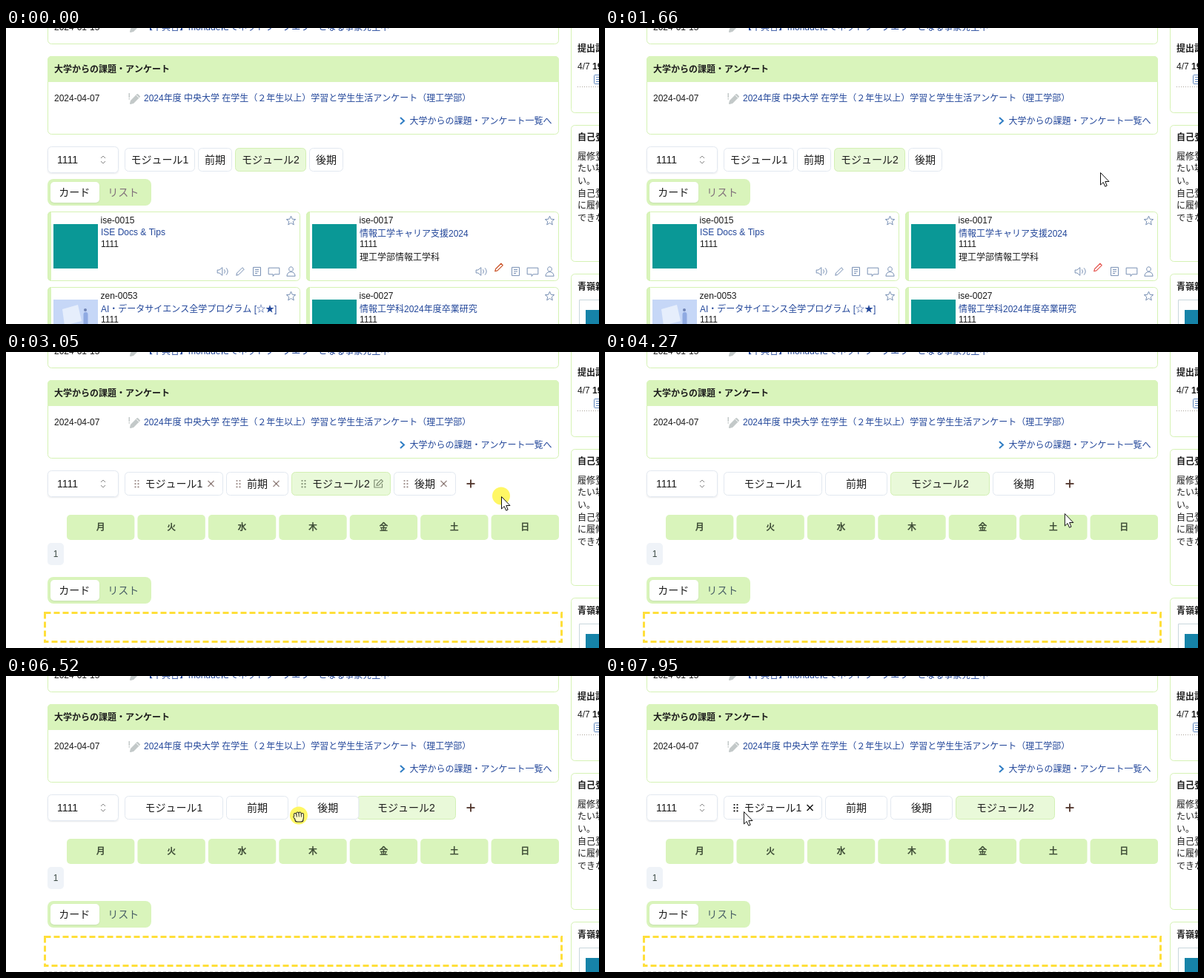
Animation of 800x400 px, one loop 8 s. Source, as an HTML page with a canvas:

```html
<!DOCTYPE html>
<html lang="ja">
<head>
<meta charset="utf-8">
<title>タブの並べ替え</title>
<style>
html, body { margin: 0; width: 100%; height: 100%; overflow: hidden; background: #fff; }
canvas { display: block; }
</style>
</head>
<body>
<canvas id="stage" width="800" height="400"></canvas>
<script>
const ctx = document.getElementById('stage').getContext('2d');
const LOOP = 8000;
const FONT = '"Liberation Sans", "Noto Sans CJK JP", "Noto Sans CJK", sans-serif';
const GREEN = '#d9f4bb', LINE = '#d5f2b4', GREY = '#e2e8f0', LINK = '#23479a', INK = '#1c1c1c';
const TEAL = '#0a9896', ICON = '#7890b4';

// Times of the main events, in ms
const EDIT = 2910, FADE_END = 3120, GRAB = 5910, DRAG = 5950, SWAP = 6240, DRAG_END = 6640, DROP = 6790;

const SHAPES = {
  star: 'M12 2l3 7 7.5.6-5.8 5 1.8 7.4L12 18l-6.500 4 1.800-7.400-5.800-5L9 9z',
  speaker: 'M1 9h4l6-5v16l-6-5H1z M15 8q3 4 0 8 M19 5q6 7 0 14',
  pencil: 'M3 21l1.500-5.500L17 3l4 4L8.500 19.500z',
  note: 'M4 3h16v18H4z M8 8h8M8 12h8M8 16h5',
  speech: 'M1 4h22v13H13l-3 4v-4H1z',
  person: 'M12 2a4.500 5 0 1 0 .01 0z M3 22q1-9 9-9q8 0 9 9z',
  edit: 'M11 4H3v16h17v-8 M8 16l1-4 9-9 3.500 3.500-9 9z',
  arrow: 'M0 0V16.500L3.700 13 6.200 18.700 8.700 17.600 6.300 12H11.500z'
};
for (const k in SHAPES) SHAPES[k] = new Path2D(SHAPES[k]);

const clamp = v => Math.min(1, Math.max(0, v));
const mix = (a, b, u) => a + (b - a) * u;
const smooth = u => { u = clamp(u); return u * u * (3 - 2 * u); };
const span = (t, a, b) => smooth((t - a) / (b - a));

function text(s, x, yc, size = 12, color = INK, weight = 400, align = 'left') {
  ctx.font = `${weight} ${size}px ${FONT}`;
  ctx.fillStyle = color;
  ctx.textAlign = align;
  ctx.fillText(s, x, Math.round(yc + size * 0.37));
}

function box(x, y, w, h, r, fill, stroke) {
  ctx.beginPath();
  ctx.roundRect(stroke ? x + .5 : x, stroke ? y + .5 : y, stroke ? w - 1 : w, stroke ? h - 1 : h, r);
  if (fill) { ctx.fillStyle = fill; ctx.fill(); }
  if (stroke) { ctx.strokeStyle = stroke; ctx.lineWidth = 1; ctx.stroke(); }
}

function raised(x, y, w, h, r, stroke) {
  ctx.save();
  ctx.shadowColor = 'rgba(40,50,70,.1)';
  ctx.shadowBlur = 2;
  ctx.shadowOffsetY = 1;
  box(x, y, w, h, r, '#fff');
  ctx.restore();
  if (stroke) box(x, y, w, h, r, null, stroke);
}

function stroke(points, color, width) {
  ctx.beginPath();
  points.forEach(([x, y], i) => i ? ctx.lineTo(x, y) : ctx.moveTo(x, y));
  ctx.strokeStyle = color;
  ctx.lineWidth = width;
  ctx.stroke();
}

function disc(x, y, r, color) {
  ctx.beginPath();
  ctx.arc(x, y, r, 0, 7);
  ctx.fillStyle = color;
  ctx.fill();
}

function icon(name, x, y, size = 14, color = ICON, width = 1, fill) {
  const k = size / 24;
  ctx.save();
  ctx.translate(x - size / 2, y - size / 2);
  ctx.scale(k, k);
  ctx.lineJoin = 'round';
  ctx.lineWidth = width / k;
  if (fill) { ctx.fillStyle = fill; ctx.fill(SHAPES[name]); }
  ctx.strokeStyle = color;
  ctx.stroke(SHAPES[name]);
  ctx.restore();
}

function newsIcon(y) {
  const grey = '#c3c9c9';
  icon('pencil', 174, y, 16, grey, 2, grey);
  stroke([[176, y - 5], [179.500, y - 1.500]], '#fff', 1);
  ctx.fillStyle = grey;
  ctx.fillRect(165.500, y - 8, 1.500, 6);
  ctx.fillRect(165.500, y - 1, 1.500, 1.500);
}

function news() {
  box(56, -40, 690, 62, 5, '#fff', LINE);
  text('2024-01-15', 65, -1);
  newsIcon(-1);
  text('【不具合】monudeにてネットワークエラーとなる事象発生中', 186, -1, 12, LINK);

  box(56, 38, 690, 106, 5, '#fff', LINE);
  box(56, 38, 690, 35, [5, 5, 0, 0], GREEN);
  text('大学からの課題・アンケート', 65, 56, 12, INK, 700);
  text('2024-04-07', 65, 95);
  newsIcon(96);
  text('2024年度 中央大学 在学生（２年生以上）学習と学生生活アンケート（理工学部）', 186, 95, 12, LINK);
  stroke([[532, 121], [537, 125.500], [532, 130]], '#2f7dc4', 2);
  text('大学からの課題・アンケート一覧へ', 544.500, 126, 12, LINK);
}

function sidebar() {
  box(762, -20, 60, 135, 5, '#fff', LINE);
  text('提出記録', 771, 28, 12, INK, 700);
  text('4/7', 771, 52);
  text('19:00', 791, 52, 12, INK, 700);
  box(793, 63, 14, 13, 1, '#fff', '#5f86bd');
  for (let y = 66; y < 74; y += 3) stroke([[796, y + .5], [800, y + .5]], '#5f86bd', 1);
  ctx.setLineDash([1, 2]);
  stroke([[771, 79.500], [800, 79.500]], '#aaa39a', 1);
  ctx.setLineDash([]);

  box(762, 131, 60, 185, 5, '#fff', LINE);
  text('自己登録', 771, 148, 12, INK, 700);
  ['履修登録', 'たい場合', 'い。', '自己登録', 'に履修登', 'できない'].forEach((s, i) => text(s, 771, 173.300 + i * 16.600));

  box(762, 332, 60, 100, 5, '#fff', LINE);
  text('青嶺新報', 771, 350, 12, INK, 700);
  box(773, 367, 60, 60, 0, '#fff', '#c9d6dc');
  ctx.fillStyle = '#1683a8';
  ctx.fillRect(782, 381, 30, 30);
}

function selectBox() {
  raised(56, 160, 96, 36, 5, GREY);
  text('1111', 69, 178, 14);
  stroke([[128, 176], [131, 173], [134, 176]], '#888', 1);
  stroke([[128, 180], [131, 183], [134, 180]], '#888', 1);
}

function viewSwitch(y, color) {
  box(56, y, 140, 36, 8, GREEN);
  raised(60, y + 4, 66, 28, 5);
  text('カード', 71.300, y + 18, 14);
  text('リスト', 137.300, y + 18, 14, color);
}

function tab(name, x, w, active) {
  box(x, 162, w, 32, 5, active ? '#e9f9d9' : '#fff', active ? '#d3f0b4' : GREY);
  text(name, x + w / 2, 178, 14, INK, 400, 'center');
}

function tabTools(x, w, active, color, alpha) {
  ctx.save();
  ctx.globalAlpha = alpha;
  for (let i = 0; i < 6; i++) disc(x + 14.500 + (i % 2) * 4, 174 + (i >> 1) * 4.200, 1.100, color);
  const cx = x + w - 16.500;
  if (active) icon('edit', cx, 178, 15, color, 1.200);
  else {
    stroke([[cx - 4, 174], [cx + 4, 182]], color, 1.400);
    stroke([[cx + 4, 174], [cx - 4, 182]], color, 1.400);
  }
  ctx.restore();
}

function card(x, y, code, title, titleY, lines, pencilColor = ICON) {
  ctx.save();
  ctx.beginPath();
  ctx.roundRect(x, y, 341, 94, 5);
  ctx.clip();
  ctx.fillStyle = GREEN;
  ctx.fillRect(x, y, 5, 94);
  ctx.restore();
  box(x, y, 341, 94, 5, null, LINE);
  text(code, x + 71.500, y + 12);
  text(title, x + 72, y + titleY, 12, LINK);
  lines.forEach((s, i) => text(s, x + 72, y + 44 + i * 17.500));
  icon('star', x + 328.500, y + 12, 14);
  icon('speaker', x + 236.500, y + 81, 16);
  if (pencilColor === ICON) icon('pencil', x + 260, y + 81, 14);
  else icon('pencil', x + 260, y + 75.500, 14, pencilColor, 1.200);
  icon('note', x + 282.500, y + 81, 15);
  icon('speech', x + 305.500, y + 81.500, 16);
  icon('person', x + 328.500, y + 81, 15);
  ctx.fillStyle = TEAL;
  ctx.fillRect(x + 8, y + 17, 60, 60);
}

function illustration() {
  ctx.fillStyle = '#c6d7f7';
  ctx.fillRect(64, 367, 60, 60);
  ctx.beginPath();
  ctx.moveTo(76, 380); ctx.lineTo(97, 374); ctx.lineTo(102, 396); ctx.lineTo(79, 402);
  ctx.fillStyle = '#e6eefc';
  ctx.fill();
  disc(107, 381, 2, '#6f83b5');
  box(104.500, 384, 6, 18, 3, '#8faae2');
}

function courses(t) {
  const u = (1 - Math.cos((t + 80) / 1040 * 2 * Math.PI)) / 2;
  const alert = `rgb(${mix(198, 242, u)},${mix(80, 88, u)},${mix(32, 98, u)})`;
  card(56, 248, 'ise-0015', 'ISE Docs & Tips', 28, ['1111']);
  card(405, 248, 'ise-0017', '情報工学キャリア支援2024', 30, ['1111', '理工学部情報工学科'], alert);
  card(56, 350, 'zen-0053', 'AI・データサイエンス全学プログラム [☆★]', 30, ['1111']);
  card(405, 350, 'ise-0027', '情報工学科2024年度卒業研究', 30, ['1111']);
  illustration();
}

function timetable() {
  [...'月火水木金土日'].forEach((d, i) => {
    const x = 82 + i * 95.430;
    box(x, 220, 91.400, 34, 5, GREEN);
    text(d, x + 45.700, 237, 12, '#3f4e37', 700, 'center');
  });
  box(56, 258, 22, 30, 5, '#eff3f8');
  text('1', 67, 273, 12, '#3c4a44', 400, 'center');
  ctx.setLineDash([8, 4]);
  ctx.strokeStyle = '#ffdf3a';
  ctx.lineWidth = 3;
  ctx.strokeRect(52.500, 352.500, 697, 39);
  ctx.setLineDash([4, 3]);
  stroke([[51, 399.500], [751, 399.500]], '#d2d2d2', 1);
  ctx.setLineDash([]);
}

// Pointer path: time, x, y
const PATH = [
  [70, 634, 343], [740, 668, 195], [3920, 668, 195], [4270, 620, 218], [4500, 582, 223],
  [4760, 547, 196], [5110, 534, 178], [DRAG, 534, 178], [DRAG_END, 383, 190],
  [7260, 383, 191], [7940, 187, 183]
];

function pointer(t) {
  let i = 0;
  while (i < PATH.length - 2 && t >= PATH[i + 1][0]) i++;
  const [t0, x0, y0] = PATH[i], [t1, x1, y1] = PATH[i + 1];
  let u = clamp((t - t0) / (t1 - t0));
  if (i === 0 || i === 5) u = u * (2 - u);
  else if (i === 2) u = Math.pow(u, 1.300);
  else if (i > 5) u = smooth(u);
  return { x: mix(x0, x1, u), y: mix(y0, y1, u) };
}

function hand(x, y, closed) {
  const top = closed ? [-2, -3.500, -3.500, -2] : [-5, -7.500, -7.500, -5];
  const bones = top.map((h, i) => [(i - 1.500) * (closed ? 3.300 : 3.700), h, (i - 1.500) * 2.900 + .5, 3]);
  bones.push(closed ? [-5.500, 1.500, -3, 4] : [-7, 1, -3, 5]);
  ctx.save();
  ctx.translate(x, y);
  ctx.lineCap = 'round';
  for (const [color, grow] of [['#222', 1], ['#fffbc4', 0]]) {
    bones.forEach(([a, b, c, d]) => stroke([[a, b], [c, d]], color, 2.200 + grow * 1.800));
    box(-4.500 - grow, 1.500 - grow, 10 + 2 * grow, 6 + 2 * grow, 3, color);
  }
  ctx.restore();
}

function arrow(x, y) {
  ctx.save();
  ctx.translate(x + .5, y + .5);
  ctx.fillStyle = '#fff';
  ctx.fill(SHAPES.arrow);
  ctx.strokeStyle = '#111';
  ctx.lineWidth = 1;
  ctx.stroke(SHAPES.arrow);
  ctx.restore();
}

function tabLayout(t) {
  let last = 523;
  if (t >= DRAG) last = pointer(Math.min(t, DROP) - 40).x - 11;
  if (t >= DROP) last = mix(last, 385, span(t, DROP, 7050));
  return [
    { name: 'モジュール1', x: 160, w: 133 },
    { name: '前期', x: 297, w: 84 },
    { name: 'モジュール2', x: mix(385, 473, span(t, SWAP, SWAP + 200)), w: 134, active: true },
    { name: '後期', x: Math.min(523, last), w: 84 }
  ];
}

function editor(t, p) {
  const tabs = tabLayout(t);
  const fade = t < FADE_END ? 1 - ((t - EDIT) / (FADE_END - EDIT)) ** 2 : 0;
  const dragging = t >= DRAG && t < 7150;
  for (const b of tabs) {
    tab(b.name, b.x, b.w, b.active);
    const over = !dragging && p.y < 194 && p.y >= 162 && p.x >= b.x && p.x < b.x + b.w;
    if (over) tabTools(b.x, b.w, b.active, '#111', 1);
    else if (fade > 0) tabTools(b.x, b.w, b.active, b.active ? '#26351e' : '#4a2c26', fade);
  }
  stroke([[621.500, 178], [632.500, 178]], '#4f3229', 1.800);
  stroke([[627, 172.500], [627, 183.500]], '#4f3229', 1.800);
  timetable();
  viewSwitch(304, '#4a6066');
  return tabs[3].x;
}

function draw(t) {
  const p = pointer(t);
  ctx.fillStyle = '#fff';
  ctx.fillRect(0, 0, 800, 400);
  news();
  sidebar();
  selectBox();
  let handleX = 0;
  if (t < EDIT) {
    tab('モジュール1', 160, 95);
    tab('前期', 259, 46);
    tab('モジュール2', 309, 96, true);
    tab('後期', 409, 46);
    viewSwitch(204, '#80707a');
    courses(t);
  } else handleX = editor(t, p);

  const press = t < 3450 ? clamp((t - 1760) / 150) : t >= GRAB && t < DROP ? 1 : 0;
  if (press) disc(p.x, p.y - .5, 12, `rgba(255,247,100,${press})`);

  if (t < 70) return;
  const onHandle = t > 4700 && t < DRAG && p.y < 194 && p.x < handleX + 20;
  if (t >= DRAG && t < DROP) hand(p.x, p.y, true);
  else if (onHandle) hand(p.x, p.y - 1, false);
  else arrow(p.x, p.y);
}

function tick() {
  draw(performance.now() % LOOP);
  requestAnimationFrame(tick);
}
tick();
</script>
</body>
</html>
```
